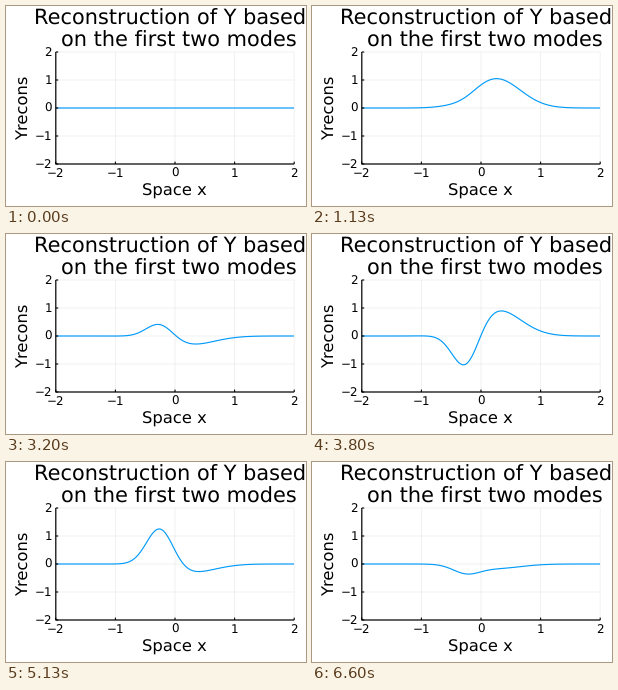
A matplotlib script for the animation above (6670 ms loop, 300x200 px).

```python
import numpy as np
import matplotlib.pyplot as plt
from matplotlib.animation import FuncAnimation

W, H, DPI = 300, 200, 100
PX = 72 / DPI             # points per pixel
TICK_MS, TICKS = 10, 667  # playback clock
STEPS = 100               # wave states per loop, 15 per second

# Plot area in pixels from the top left
LEFT, TOP, WIDTH, HEIGHT = 49.8, 46, 238.4, 112

plt.rcParams["font.family"] = "DejaVu Sans"
plt.rcParams["text.hinting"] = "no_hinting"
plt.rcParams["path.simplify"] = False

x = np.linspace(-2, 2, 401)
wide = 1.25 * np.exp(-3 * (x - 0.25) ** 2)
narrow = 1.5 * np.exp(-10 * (x + 0.25) ** 2)


def wave(t):
    """Sum of two standing modes, t in 0..1 over one loop."""
    return wide * np.sin(4 * np.pi * t) + narrow * np.sin(6 * np.pi * t)


fig = plt.figure(figsize=(W / DPI, H / DPI), dpi=DPI, facecolor="white")
ax = fig.add_axes([LEFT / W, 1 - (TOP + HEIGHT) / H, WIDTH / W, HEIGHT / H])
ax.axis("off")


def label(px, py, text, size, **kw):
    kw = {"ha": "center", "va": "baseline", **kw}
    fig.text(px / W, 1 - py / H, text, fontsize=size * PX, color="black", **kw)


def rules(xs, ys, width, **kw):
    """Straight lines, one per column of the end points in xs and ys."""
    ax.plot(xs, ys, linewidth=width * PX, color="black", snap=False,
            clip_on=False, solid_capstyle="butt", **kw)


marks = np.arange(-2, 3)
ends = np.array([[-2], [2]]) + 0 * marks
both = np.array([marks, marks])
rules(both, ends, 1, alpha=0.055)
rules(ends, both, 1, alpha=0.055)

curve, = ax.plot(x, wave(0), color="#009AFA", linewidth=1.15 * PX, snap=False)

rules([-2, -2, 2], [2, -2, -2], 1.2)
base = 0 * both - 2.0
inward = np.array([[0], [2.4 * 4]])
rules(both, base + inward / HEIGHT, 1.1)
rules(base + inward / WIDTH, both, 1.1)

for v in marks:
    name = str(v).replace("-", "\u2212")
    label(LEFT + (v + 2) * WIDTH / 4, 171, name, 11.9)
    label(46, TOP + (2 - v) * HEIGHT / 4 + 4, name, 11.9, ha="right")

label(164.5, 19, "Reconstruction of Y based", 20.83)
label(172.7, 41, "on the first two modes", 20.83)
label(168.7, 189.5, "Space x", 16.4)
label(22, 101.5, "Yrecons", 16.4, rotation=90, rotation_mode="anchor")

ax.set(xlim=(-2, 2), ylim=(-2, 2))


def draw(i):
    step = (3 * i + 1) // 20  # holds of 70, 60 and 70 ms
    curve.set_ydata(wave(step / STEPS))
    return curve,


anim = FuncAnimation(fig, draw, frames=TICKS, interval=TICK_MS, repeat=True,
                     repeat_delay=0, blit=False, cache_frame_data=False)
plt.show()
```
